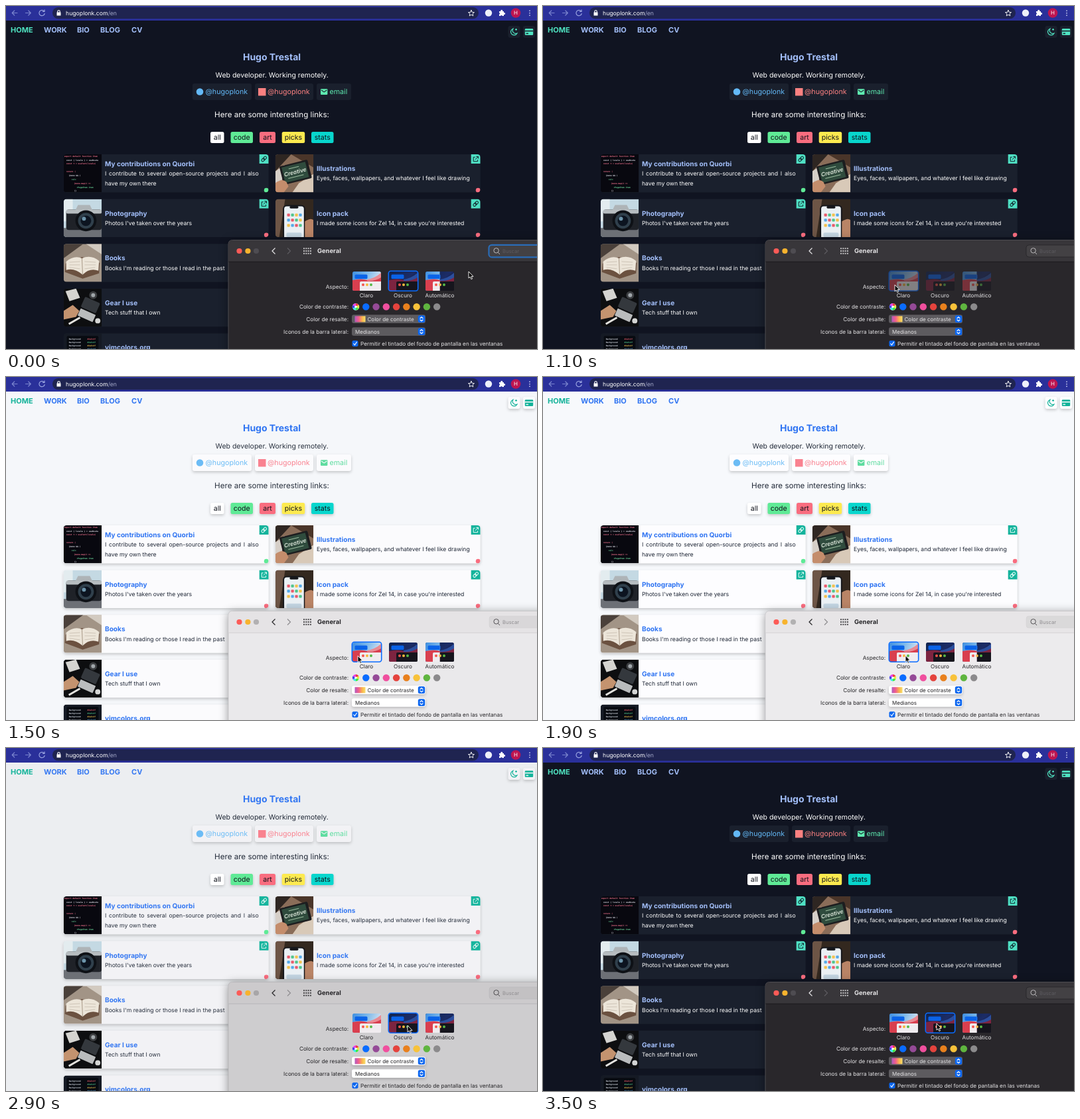
Recreate the animation shown at these times as an HTML page. Size 800 px wide and 518 px high, loop 3600 ms.

```html
<!DOCTYPE html>
<html lang="en">
<head>
<meta charset="utf-8">
<title>Theme switch</title>
<style>
@property --bg { syntax: '<color>'; inherits: true; initial-value: #101421; }
@property --card { syntax: '<color>'; inherits: true; initial-value: #1a202d; }
@property --desc { syntax: '<color>'; inherits: true; initial-value: #fff; }
@property --shade { syntax: '<color>'; inherits: true; initial-value: #0000; }
@property --title { syntax: '<color>'; inherits: true; initial-value: #a3bffa; }
@property --home { syntax: '<color>'; inherits: true; initial-value: #4fe3c1; }
@property --badge { syntax: '<color>'; inherits: true; initial-value: #4fe0c4; }
@property --glyph { syntax: '<color>'; inherits: true; initial-value: #10242c; }
@property --blue { syntax: '<color>'; inherits: true; initial-value: #63b9f7; }
@property --pink { syntax: '<color>'; inherits: true; initial-value: #fc8181; }
@property --green { syntax: '<color>'; inherits: true; initial-value: #5eeab0; }
@property --ink { syntax: '<color>'; inherits: true; initial-value: #fff; }
@property --bar { syntax: '<color>'; inherits: true; initial-value: #38363a; }
@property --pane { syntax: '<color>'; inherits: true; initial-value: #29272b; }
@property --edge { syntax: '<color>'; inherits: true; initial-value: #5c5a5f; }
@property --line { syntax: '<color>'; inherits: true; initial-value: #171619; }

html, body { margin: 0; width: 100%; height: 100%; overflow: hidden; background: #101421; }
svg { display: block; }
#stage {
  width: 800px; height: 518px;
  font-family: Inter, sans-serif; text-rendering: geometricPrecision;
  animation: controls 3.6s step-end infinite, page 3.6s ease infinite,
    ink 3.6s ease infinite, panel 3.6s ease infinite;
}
@keyframes controls {
  0%, 81.5%, 100% { --label: #e4e3e5; --faint: #5d5b60; --field: #5d5b5f; }
  34%  { --label: #262528; --faint: #8f8d90; --field: #fff; }
}
@keyframes page {
  0%, 31.94%, 90.97%, 100% { --bg: #101421; --card: #1a202d; --desc: #fff; --shade: #0000;
    --title: #a3bffa; --home: #4fe3c1; --badge: #4fe0c4; --glyph: #10242c;
    --blue: #63b9f7; --pink: #fc8181; --green: #5eeab0; }
  43.06%, 79.86% { --bg: #f7f9fc; --card: #fdfdff; --desc: #1c2433; --shade: #0003;
    --title: #2f74f2; --home: #12b299; --badge: #14b39c; --glyph: #e8fffa;
    --blue: #6cbcf5; --pink: #f98290; --green: #5fdca0; }
}
@keyframes ink {
  0%, 33.3%, 95%, 100% { --ink: #fff; }
  44.4%, 83.9% { --ink: #222a38; }
}
@keyframes panel {
  0%, 31.94%, 89.5%, 100% { --bar: #38363a; --pane: #29272b; --edge: #5c5a5f; --line: #171619; }
  43.06%, 79.2% { --bar: #e7e5e7; --pane: #ecebed; --edge: #c3c1c4; --line: #d0ced1; }
}
@keyframes pick { 0%, 75%, 100% { transform: none; } 27.8% { transform: translateX(-55px); } }
@keyframes press { 0%, 33%, 80%, 100% { opacity: 1; } 27.8%, 75% { opacity: .45; } }
@keyframes blur { 0% { opacity: 1; } 27.8%, 100% { opacity: 0; } }
@keyframes pointer {
  0%, 3% { transform: translate(697px, 401px); }
  24%, 48% { transform: translate(530px, 421px); }
  63%, 91% { transform: translate(605px, 419px); }
  97%, 100% { transform: translate(593px, 416px); }
}
#ring { animation: pick 3.6s step-end infinite; }
#looks { animation: press 3.6s step-end infinite; }
#focus { animation: blur 3.6s step-end infinite; }
#pointer { animation: pointer 3.6s ease-in-out infinite; }

.bg { fill: var(--bg); }
.card { fill: var(--card); }
.lift { filter: drop-shadow(0 2px 2px var(--shade)); }
.title { fill: var(--title); font-weight: 700; }
.home { fill: var(--home); }
.badge { fill: var(--badge); }
.glyph { fill: none; stroke: var(--glyph); stroke-width: 1; }
.desc { fill: var(--desc); font-size: 8.66px; }
.ink { fill: var(--ink); }
.blue { fill: var(--blue); } .pink { fill: var(--pink); } .green { fill: var(--green); }
.mid { text-anchor: middle; }
.end { text-anchor: end; }
.label { fill: var(--label); font-size: 8.2px; }
.faint { fill: var(--faint); }
.field { fill: var(--field); }
.stroke { fill: none; stroke: #fff; stroke-width: 1.2; stroke-linecap: round; stroke-linejoin: round; }
.mono { font-family: "DejaVu Sans Mono", monospace; font-size: 3px; font-weight: 700; white-space: pre; }
#window { filter: drop-shadow(0 2px 7px #0006); }
</style>
</head>
<body>
<svg id="stage" viewBox="0 0 800 518">
  <defs>
    <clipPath id="cardClip"><rect width="309" height="57.5" rx="4.5"/></clipPath>
    <clipPath id="lookClip"><rect width="43" height="29" rx="2.5"/></clipPath>
    <clipPath id="leftHalf"><path d="M0 0H21.5V29H0Z"/></clipPath>
    <linearGradient id="day" y2=".3"><stop stop-color="#3f8fe0"/><stop offset=".5" stop-color="#7cb8ea"/><stop offset="1" stop-color="#d5e3f0"/></linearGradient>
    <linearGradient id="night" y2=".7"><stop stop-color="#10244f"/><stop offset=".6" stop-color="#1c2c66"/><stop offset="1" stop-color="#0b1128"/></linearGradient>
    <linearGradient id="rainbow"><stop stop-color="#b05cc0"/><stop offset=".35" stop-color="#f25c8c"/><stop offset=".7" stop-color="#f9b64c"/><stop offset="1" stop-color="#f8df6a"/></linearGradient>
  </defs>

  <rect class="bg" width="800" height="518"/>

  <g id="browser">
    <rect width="800" height="22" fill="#2a309a"/>
    <rect x="70" y="1.7" width="642" height="17.6" rx="8.8" fill="#1f2450"/>
    <path class="stroke" style="stroke:#7c86cf" d="M17 10.5H9.5M12.7 7L9.2 10.5L12.7 14M29.5 10.5H37M33.8 7L37.3 10.5L33.8 14"/>
    <path class="stroke" style="stroke:#99a3e0" d="M57.5 8A4.2 4.2 0 1 0 58.2 11.5M58 5.8V8.5H55.3"/>
    <path d="M76.5 9.5H82.5V14.5H76.5Z" fill="#fff"/>
    <path class="stroke" d="M77.8 9.5V8.2A1.7 1.7 0 0 1 81.2 8.2V9.5"/>
    <text x="90" y="13.8" font-size="8.7" fill="#fff">hugoplonk.com<tspan fill="#a3a8c8">/en</tspan></text>
    <path class="stroke" style="stroke-width:.9" d="M701 6.3L702.3 9.3L705.5 9.6L703.1 11.7L703.8 14.9L701 13.2L698.2 14.9L698.9 11.7L696.5 9.6L699.7 9.3Z"/>
    <circle cx="727" cy="10.5" r="5.2" fill="#eef0fa"/>
    <path d="M743 8H745.3A1.6 1.6 0 1 1 748.2 8H750V10A1.6 1.6 0 1 1 750 13V15H747.8A1.5 1.5 0 0 0 745 15H743V12.7A1.4 1.4 0 0 0 743 10Z" fill="#fff"/>
    <circle cx="768" cy="10.5" r="7.3" fill="#bd1550"/>
    <text class="mid" x="768" y="13.4" font-size="8" fill="#fff">H</text>
    <path d="M789 7.2v.01M789 10.7v.01M789 14.2v.01" stroke="#c9cdf0" stroke-width="1.7" stroke-linecap="round"/>
  </g>

  <g font-size="11" class="title">
    <text class="home" x="7" y="40">HOME</text>
    <text x="57" y="40">WORK</text>
    <text x="107" y="40">BIO</text>
    <text x="142" y="40">BLOG</text>
    <text x="189" y="40">CV</text>
    <text class="mid" x="400.5" y="81.5" font-size="14">Hugo Trestal</text>
  </g>
  <g class="card lift">
    <rect x="756.5" y="30" width="18" height="18" rx="3"/>
    <rect x="779" y="30" width="18" height="18" rx="3"/>
  </g>
  <path d="M764 34.2A5 5 0 1 0 770 41.2A4.8 4.8 0 0 1 764 34.2ZM768.5 34V37M767 35.5H770" style="fill:none;stroke:var(--home)" stroke-width="1.2"/>
  <rect class="home" x="781.8" y="34.3" width="12.4" height="9.6" rx="1.2"/>
  <path d="M781.8 37.8H794.2M783.5 41.5H787" style="stroke:var(--card)" stroke-width="1.5"/>

  <text class="ink mid" x="400.7" y="107.7" font-size="10.5">Web developer. Working remotely.</text>
  <g class="card lift">
    <rect x="281" y="117" width="89" height="25" rx="3"/>
    <rect x="375" y="117" width="88" height="25" rx="3"/>
    <rect x="468" y="117" width="52" height="25" rx="3"/>
  </g>
  <g font-size="10.7">
    <g class="blue"><circle cx="292" cy="129.5" r="5.3"/><text x="300.5" y="133.3">@hugoplonk</text></g>
    <g class="pink"><rect x="380" y="124" width="11.5" height="11.5"/><text x="394" y="133.3">@hugoplonk</text></g>
    <g class="green"><rect x="474" y="125.3" width="10.4" height="8.6" rx="1"/><text x="487.5" y="133.3">email</text></g>
    <path d="M475 127L479.2 129.9L483.4 127" fill="none" style="stroke:var(--card)" stroke-width="1.1"/>
  </g>
  <text class="ink mid" x="400.5" y="168" font-size="11.6">Here are some interesting links:</text>

  <g id="tags" class="mid" font-size="10.6"></g>
  <g id="cards"></g>

  <g id="window">
    <path d="M335 530V360Q335 353.5 341.5 353.5H820V530Z" style="fill:var(--pane);stroke:var(--edge)" stroke-width=".8"/>
    <path d="M335.4 386V360Q335.4 354 341.5 354H820V386Z" style="fill:var(--bar)"/>
    <path d="M335.4 386.3H800" style="stroke:var(--line)" stroke-width=".8"/>
  </g>
  <circle cx="351.5" cy="370" r="4.1" fill="#fc5b57"/>
  <circle cx="364.4" cy="370" r="4.1" fill="#f7b32e"/>
  <circle class="faint" cx="377" cy="370" r="4.1" opacity=".6"/>
  <path d="M405.5 365.5L401 370L405.5 374.5" fill="none" style="stroke:var(--label)" stroke-width="1.2"/>
  <path d="M424 365.5L428.5 370L424 374.5" fill="none" style="stroke:var(--faint)" stroke-width="1.2"/>
  <path d="M448 366.3H460M448 370H460M448 373.7H460" style="stroke:var(--label)" stroke-width="2" stroke-dasharray="2 1.3" opacity=".8"/>
  <text class="label" x="469" y="373.3" style="font-size:9.4px;font-weight:700">General</text>
  <rect x="728" y="361" width="90" height="18" rx="4" fill="#8882" style="stroke:var(--line)" stroke-width=".5"/>
  <rect id="focus" x="727.5" y="360.8" width="90" height="18.6" rx="4.5" fill="none" stroke="#2a6db8" stroke-width="2.2"/>
  <path d="M741.6 372.4L744 375M742.3 369.3A3.7 3.7 0 1 1 734.9 369.3A3.7 3.7 0 1 1 742.3 369.3Z" fill="none" style="stroke:var(--label)" stroke-width="1" opacity=".75"/>
  <text class="faint" x="748" y="373" font-size="7.6">Buscar</text>

  <g class="label end">
    <text x="516" y="427">Aspecto:</text>
    <text x="516" y="457.3">Color de contraste:</text>
    <text x="516" y="475.5">Color de resalte:</text>
    <text x="516" y="494.5">Iconos de la barra lateral:</text>
  </g>
  <g id="looks">
    <g id="lookList"></g>
    <rect id="ring" x="576.3" y="400.3" width="44.4" height="30" rx="3.5" fill="none" stroke="#0a6cff" stroke-width="1.6"/>
  </g>
  <g class="label mid">
    <text x="543" y="440">Claro</text>
    <text x="598" y="440">Oscuro</text>
    <text x="653.5" y="440">Automático</text>
  </g>
  <g id="accents"></g>
  <g class="lift">
    <rect class="field" x="521" y="466.3" width="111" height="12.8" rx="3"/>
    <rect class="field" x="521" y="485.3" width="111" height="12.8" rx="3"/>
  </g>
  <rect x="525.5" y="468.3" width="16" height="9" fill="url(#rainbow)"/>
  <g class="label">
    <text x="544.5" y="475.5" style="font-size:8px">Color de contraste</text>
    <text x="526" y="494.6" style="font-size:8px">Medianos</text>
    <text x="534" y="512.7">Permitir el tintado del fondo de pantalla en las ventanas</text>
  </g>
  <g fill="#0a66f0">
    <rect x="620.8" y="467.3" width="10.4" height="10.8" rx="2.5"/>
    <rect x="620.8" y="486.3" width="10.4" height="10.8" rx="2.5"/>
    <rect x="521.5" y="505.2" width="9" height="9" rx="2"/>
  </g>
  <path class="stroke" d="M624 471.5L626 469.7L628 471.5M624 474L626 475.8L628 474M624 490.5L626 488.7L628 490.5M624 493L626 494.8L628 493M523.8 510L525.4 512L528.4 507.5"/>

  <path id="pointer" d="M0 0V10L2.3 8L3.9 11.6L5.6 10.9L4 7.4H7Z" fill="#000" stroke="#fff" stroke-width=".9"/>
</svg>

<script>
const fill = (id, items, draw) => {
  document.getElementById(id).innerHTML = items.map(draw).join('');
};
const rect = (x, y, w, h, color, more = '') =>
  `<rect x="${x}" y="${y}" width="${w}" height="${h}" fill="${color}" ${more}/>`;
const disc = (x, y, r, color) => `<circle cx="${x}" cy="${y}" r="${r}" fill="${color}"/>`;
const shape = (d, color) => `<path d="${d}" fill="${color}"/>`;
const bars = (d, color, w) => `<path d="${d}" fill="none" stroke="${color}" stroke-width="${w}"/>`;
const mono = (x, y, color, text) => `<text class="mono" x="${x}" y="${y}" fill="${color}">${text}</text>`;

const photos = {
  code: () => rect(0, 0, 58, 58, '#08080f') +
    mono(1, 4.5, '#f4738f', 'export default function Item') +
    mono(4, 10, '#e4e4ee', 'const { locale } = useRoute') +
    mono(4, 15.5, '#f4738f', 'const t = useText(locale)') +
    mono(4, 27, '#f4738f', 'return (') +
    mono(8, 33, '#e4e4ee', '{menu &amp;&amp; (') +
    mono(12, 39, '#6fe0a2', '&lt;ul&gt;') +
    mono(16, 45, '#f4738f', '{menu.map(i =&gt;') +
    mono(20, 51, '#6fe0a2', '&lt;PageItem item') +
    mono(16, 56.5, '#e4e4ee', ')}'),
  tablet: () => rect(0, 0, 58, 58, '#8a6d59') + shape('M0 0H24L0 26Z', '#2e2622') +
    shape('M24 0H58V20Z', '#4a3529') + shape('M0 26L14 16L10 40L0 46Z', '#d6cfc8') +
    shape('M36 44L58 30V58H26Z', '#d8c9b8') +
    `<g transform="rotate(-14 30 28)">${rect(9, 13, 44, 29, '#1c1d1f', 'rx="2"')}${rect(12, 15.5, 37, 24, '#2f4b3d')}
      <text x="30.5" y="30" class="mid" font-size="8.5" font-style="italic" font-weight="600" fill="#dfe8dc">Creative</text>
      ${bars('M18 34H42M22 20H38', '#9bbd9f', 1)}</g>` +
    shape('M0 44Q10 36 17 42L20 49L13 58H0Z', '#c48d6c'),
  camera: () => rect(0, 0, 58, 58, '#c4d9e3') + rect(0, 44, 58, 14, '#6d7076') +
    shape('M0 0H14V34H0Z', '#e3ecef') +
    rect(4, 16, 54, 31, '#1f2228', 'rx="4"') + shape('M18 17L22 9H40L44 17Z', '#aeb4b7') +
    rect(4, 16, 54, 6, '#b7bdc0', 'rx="2"') + disc(34, 33, 16, '#0e1116') + disc(34, 33, 12, '#30404c') +
    disc(34, 33, 8, '#0c1420') + disc(31, 30, 3, '#6d95ab'),
  phone: () => {
    const hues = ['#e95b6b', '#54a9e8', '#f2c14d', '#4fc48c'];
    const icons = Array.from({ length: 12 }, (_, i) =>
      rect(18 + i % 4 * 6, 22 + (i >> 2) * 8, 4.3, 4.3, hues[(i * 3 + (i >> 2)) % 4], 'rx="1"')).join('');
    return rect(0, 0, 58, 58, '#33281f') + shape('M0 0H15L6 58H0Z', '#6d5546') +
      rect(11.5, 9, 34, 58, '#15161a', 'rx="6"') + rect(13.5, 11, 30, 52, '#eaf0f4', 'rx="4"') +
      rect(22, 10.5, 13, 3.7, '#15161a', 'rx="1.5"') + icons + rect(17, 51, 23, 7, '#c3d5e2', 'rx="2"') +
      shape('M45 34Q54 28 58 32V58H45Z', '#b98466');
  },
  book: () => rect(0, 0, 58, 58, '#a29486') + shape('M0 0H30L0 22Z', '#4a403a') + shape('M34 0H58V16Z', '#d2cac0') +
    shape('M3 30L28 20L55 29L54 45L29 53L2 43Z', '#6b5140') +
    shape('M4 27Q16 17 28 22Q42 16 54 26L53 41Q40 36 29 47Q16 36 4 40Z', '#ece5d9') +
    bars('M28 22L29 47', '#a69785', 1) +
    bars('M9 28L25 27M9 32L25 32M9 36L25 38M32 27L49 28M32 32L49 32M32 38L48 36', '#c5bbad', .8),
  gear: () => rect(0, 0, 58, 58, '#0d0e10') + shape('M3 4L19 0L25 14L9 19Z', '#d5d4d0') +
    `<g transform="rotate(24 36 30)">${rect(26, 15, 25, 17, '#34383d', 'rx="2"')}${rect(27, 34, 25, 12, '#babcbd', 'rx="1"')}</g>` +
    disc(45, 10, 6, '#3c3e41') + disc(45, 10, 3, '#a0a6aa') +
    shape('M0 34L14 25L24 34L19 43L0 47Z', '#c4936f') + bars('M8 54L25 44', '#e4e3df', 3) + disc(52, 49, 4, '#d4d5d4'),
  editor: () => rect(0, 0, 58, 58, '#151a24') + rect(5, 4, 48, 54, '#080b11', 'rx="2"') +
    [0, 1, 2, 3].map(i => mono(8, 10 + i * 5, '#d4d8e0', 'Background') +
      mono(36, 10 + i * 5, ['#e95b6b', '#4fc48c', '#f2c14d', '#54a9e8'][i], '#2a3c4f')).join('')
};

const icons = {
  link: '<g transform="rotate(-45 7 7)"><rect x="2.4" y="5.1" width="5.4" height="3.8" rx="1.9"/><rect x="6.2" y="5.1" width="5.4" height="3.8" rx="1.9"/></g>',
  out: '<path d="M6 4.3H3.5V10.7H9.9V8.2M7.6 3.3H10.8V6.5M10.8 3.3L6.2 7.9"/>'
};

fill('tags', [
  ['all', 308, 20.5, '#fff'], ['code', 338.5, 33.5, '#5fea96'], ['art', 382, 24, '#f96d7f'],
  ['picks', 415.7, 34.5, '#fdea4f'], ['stats', 460, 33.5, '#08d6cd']
], ([word, x, w, color]) =>
  `<g class="lift">${rect(x, 190, w, 17, color, 'rx="2.5"')}</g><text x="${x + w / 2}" y="202.3" fill="#10131c">${word}</text>`);

const green = '#5fea96', rose = '#f96d7f';
fill('cards', [
  [0, 0, 'code', 'My contributions on Quorbi', ['I contribute to several open-source projects and I also', 'have my own there'], 'link', green],
  [1, 0, 'tablet', 'Illustrations', ['Eyes, faces, wallpapers, and whatever I feel like drawing'], 'out', rose],
  [0, 1, 'camera', 'Photography', ["Photos I've taken over the years"], 'out', rose],
  [1, 1, 'phone', 'Icon pack', ["I made some icons for Zel 14, in case you're interested"], 'link', rose],
  [0, 2, 'book', 'Books', ["Books I'm reading or those I read in the past"], 'out', rose],
  [0, 3, 'gear', 'Gear I use', ['Tech stuff that I own'], 'out', rose],
  [0, 4, 'editor', 'vimcolors.org', [], 'out', green]
], ([col, row, photo, title, lines, icon, dot]) => {
  const top = lines.length > 1 ? 17.5 : 25;
  const body = lines.map((line, i) =>
    `<text class="desc" x="62.3" y="${top + 14.4 + i * 15.2}" ${i < lines.length - 1 ? 'word-spacing="1.35"' : ''}>${line}</text>`);
  return `<g transform="translate(${86.7 + col * 319} ${224 + row * 67.6})">
    <rect class="card lift" width="309" height="57.5" rx="4.5"/>
    <g clip-path="url(#cardClip)"><svg width="57.5" height="57.5" viewBox="0 0 58 58">${photos[photo]()}</svg>
      <rect class="badge" x="295" width="14" height="14"/><g class="glyph" transform="translate(295 0)">${icons[icon]}</g>
      ${disc(305.5, 54.2, 3.4, dot)}</g>
    <text class="title" x="62.3" y="${top}" font-size="10.1">${title}</text>${body.join('')}</g>`;
});

const look = (sky, glow, haze, pane) => rect(0, 0, 43, 29, `url(#${sky})`) +
  shape('M0 29V13Q14 10 22 13T43 8V16Q28 19 20 29Z', glow) + shape('M22 12Q34 10 43 2V9Q34 15 22 14Z', haze) +
  rect(3.5, 4.5, 19, 6.5, '#0a63e8', 'rx="1.5"') + rect(11, 15, 34, 16, pane, 'rx="2"') +
  disc(16, 20, 2, '#f5544d') + disc(22, 20, 2, '#f6b73c') + disc(28, 20, 2, '#55b948');
const day = look('day', '#d93f4f', '#e98a93', '#f0ecef');
const night = look('night', '#7d2440', '#2c4f9e', '#16151d');
fill('lookList', [day, night, `${night}<g clip-path="url(#leftHalf)">${day}</g>`], (art, i) =>
  `<g transform="translate(${522 + i * 55} 401)" clip-path="url(#lookClip)">${art}</g>`);

fill('accents', ['#f3f3f3', '#0a6cff', '#954a97', '#f04f9e', '#e4433d', '#e8801d', '#f8c23a', '#5fb53f', '#8b8a8c'],
  (color, i) => disc(527 + i * 15.27, 454.2, 5.2, color));
document.getElementById('accents').innerHTML += Array.from({ length: 6 }, (_, i) =>
  `<path transform="rotate(${i * 60} 527 454.2)" d="M527 454.2V449A5.2 5.2 0 0 1 531.5 451.6Z" fill="hsl(${i * 60} 80% 58%)"/>`).join('') +
  disc(527, 454.2, 1.7, '#fff');
</script>
</body>
</html>
```
